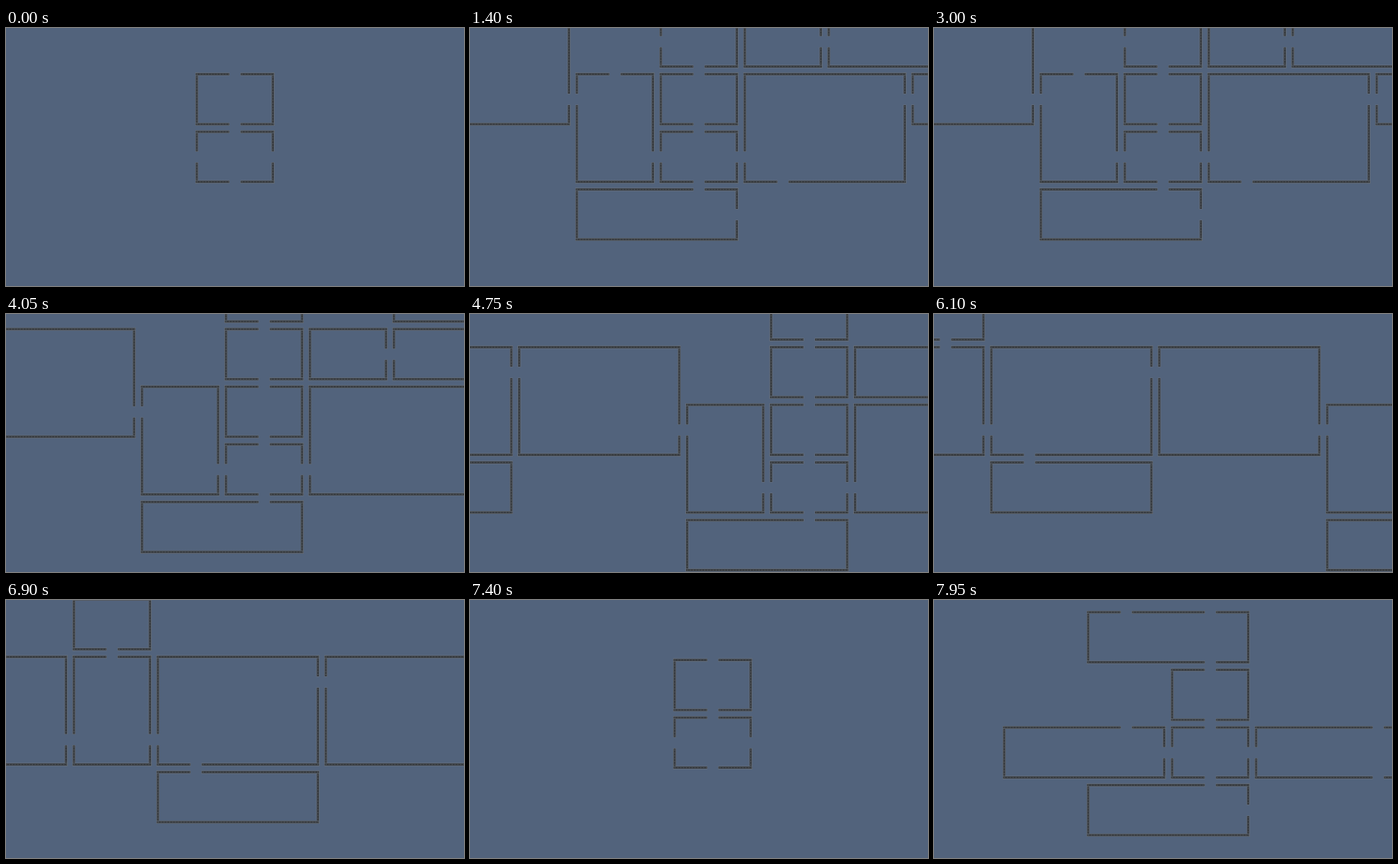
Recreate the animation shown at these times as an HTML page with a canvas. Size 600 px wide and 338 px high, loop 8000 ms.

```html
<!DOCTYPE html>
<html>
<head>
<meta charset="utf-8">
<style>
html, body { margin: 0; height: 100%; overflow: hidden; background: #52637c; }
canvas { display: block; }
</style>
</head>
<body>
<canvas id="stage" width="600" height="338"></canvas>
<script>
const ctx = document.getElementById('stage').getContext('2d');
const LOOP = 8000, STEP = 50, RESET = 7250;
const PX = 110, PY = 75.5; // grid pitch

// Room: column, row, columns, rows, doors, time it appears.
// Door: side + cell along that side, optionally ":time" when it is walled up.
const first = [
  [0, 0, 1, 1, 't0 b0', 0],
  [0, 1, 1, 1, 't0 b0 l0 r0', 0],
  [-1, 2, 2, 1, 't1 r0:3350', 50],
  [1, 0, 2, 2, 'l1 r0 b0:3150', 100],
  [-1, 0, 1, 2, 'l0 r1 t0:3250', 150],
  [0, -1, 1, 1, 't0 b0 l0:3050', 200],
  [-3, -1, 2, 2, 'l0 r1', 250],
  [3, 0, 1, 1, 'l0', 300],
  [0, -2, 1, 1, 'b0', 350],
  [-5, -1, 2, 2, 'r0 l1 b0', 400],
  [2, -2, 2, 1, '', 450],
  [-5, 1, 2, 1, 't0', 500],
  [-6, -1, 1, 2, 'l1 r1 t0', 500],
  [2, -1, 2, 1, 'l0', 550],
  [-6, -2, 1, 1, 'b0', 550],
  [1, -1, 1, 1, 'r0', 600],
  [-8, -1, 2, 2, 'r1', 600]
];
const second = [
  [0, 0, 1, 1, 't0 b0', 0],
  [0, 1, 1, 1, 't0 b0 l0 r0', 0],
  [-1, -1, 2, 1, 't0 t1 b1', 7750],
  [-1, 2, 2, 1, 't1 r0', 7800],
  [-2, 1, 2, 1, 't1 r0', 7850],
  [1, 1, 2, 1, 'l0 t1 b1', 7900]
];

// Camera: time, x, y
const path = [
  [0, 0, 0], [3600, 0, 0], [3750, 4, 3.6], [3850, 13, 12], [4050, 38.2, 34.8],
  [4245, 62, 58.5], [4750, 144.5, 58.5], [6370, 421.3, 58.5],
  [6625, 452, 89.5], [6900, 499, 89.5], [7249, 559, 89.5],
  [RESET, 0, 0], [7764, 62, 62], [7950, 62, 31], [LOOP, 62, 31]
];

function camera(t) {
  const i = path.findIndex(p => p[0] > t);
  const a = path[i - 1], b = path[i];
  const k = (t - a[0]) / (b[0] - a[0]);
  return [a[1] + (b[1] - a[1]) * k, a[2] + (b[2] - a[2]) * k];
}

function bar(x, y, len, upright) {
  ctx.save();
  ctx.translate(x, y);
  if (upright) ctx.transform(0, 1, 1, 0, 0, 0);
  ctx.fillStyle = '#69717b';
  ctx.fillRect(0, -2, len, 4);
  ctx.fillStyle = '#383c41';
  ctx.fillRect(0.5, -1.4, len - 1, 2.8);
  ctx.fillStyle = '#54595f';
  for (let d = 2; d < len - 1; d += 3.75) ctx.fillRect(d, -0.7, 1, 1.4);
  ctx.restore();
}

// One side of a room, broken by door gaps centred at the given places
function side(x, y, len, upright, gaps) {
  let from = 0;
  for (const g of [...gaps, len + 7]) {
    const to = g - 7;
    bar(upright ? x : x + from, upright ? y + from : y, to - from, upright);
    from = g + 7;
  }
}

function room([col, row, w, h, doors], t, cx, cy) {
  const x = 250 + PX * col + cx, y = 60.5 + PY * row + cy;
  const width = PX * w - 10.4, height = PY * h - 10;
  const gaps = { t: [], b: [], l: [], r: [] };
  for (const d of doors.split(' ').filter(Boolean)) {
    const [spot, close] = d.split(':');
    if (close && t >= +close) continue;
    const s = spot[0], n = +spot[1];
    gaps[s].push('tb'.includes(s) ? 52 + PX * n : 35 + PY * n);
  }
  side(x, y - 2, height + 4, true, gaps.l);
  side(x + width, y - 2, height + 4, true, gaps.r);
  side(x - 2, y, width + 4, false, gaps.t);
  side(x - 2, y + height, width + 4, false, gaps.b);
}

function draw(now) {
  const t = Math.floor(now % LOOP / STEP) * STEP;
  const [cx, cy] = camera(t);
  ctx.fillStyle = '#52637c';
  ctx.fillRect(0, 0, 600, 338);
  for (const r of t < RESET ? first : second)
    if (t >= r[5]) room(r, t, cx, cy);
}

const start = performance.now();
function tick() {
  draw(performance.now() - start);
  requestAnimationFrame(tick);
}
tick();
</script>
</body>
</html>
```
